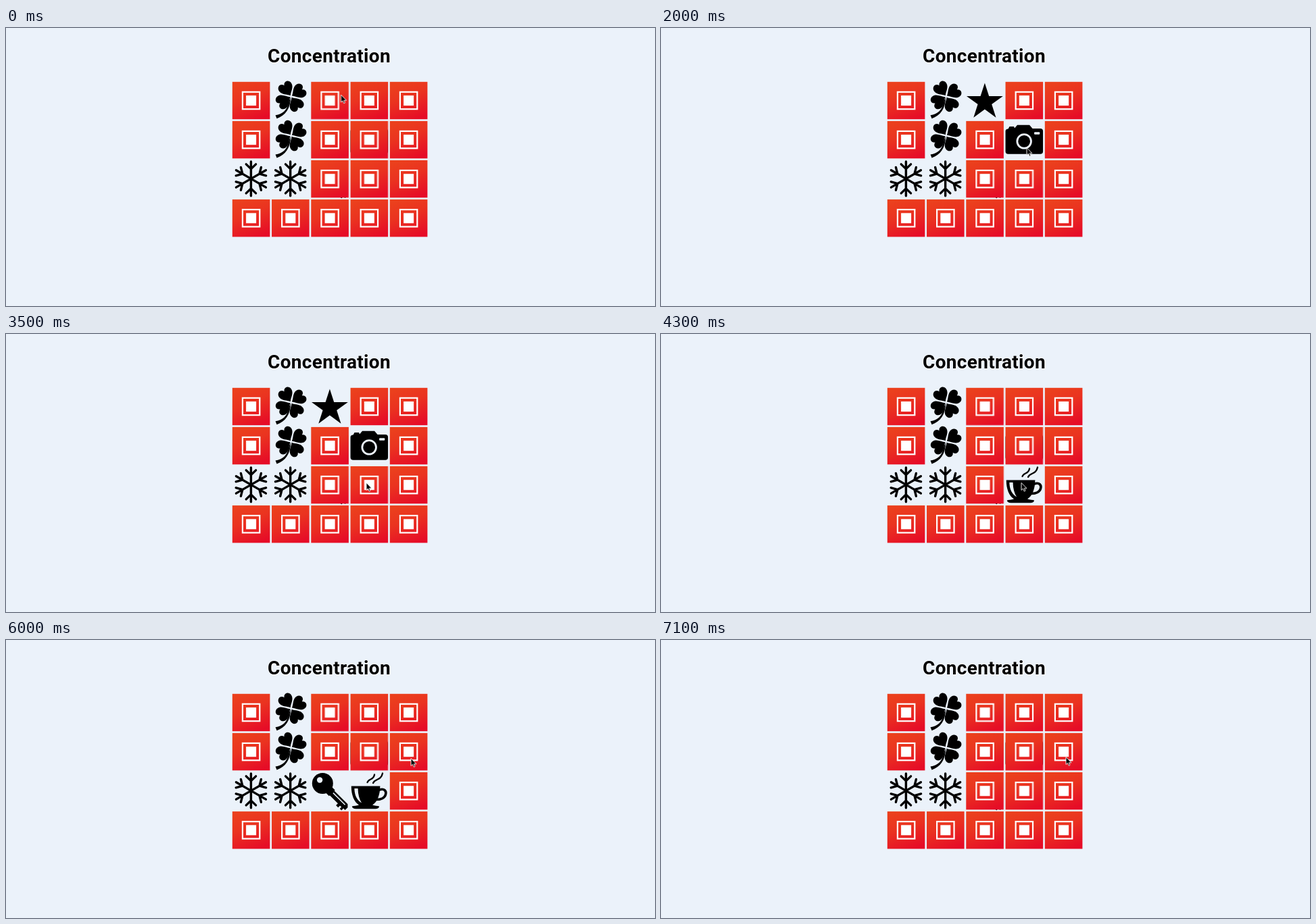
Write an HTML page that moves like this. It is 960 px wide and 412 px high and loops after 7200 ms.

```html
<!DOCTYPE html>
<html lang="en">
<head>
<meta charset="utf-8">
<title>Concentration</title>
<style>
  html, body { margin: 0; width: 100%; height: 100%; overflow: hidden; background: #ebf2fa; }
  svg { display: block; width: 960px; height: 412px; }
  .title {
    font: 700 28px Roboto, "Open Sans", sans-serif;
    letter-spacing: .3px;
    text-anchor: middle;
    text-shadow: 0 0 2px #fff, 1px 1px 1px #fff;
  }
  .line { fill: none; stroke: #000; stroke-linecap: round; stroke-linejoin: round; }
  .light { fill: #ebf2fa; }

  .star, .camera, .cup, .key { animation: 7.2s step-end infinite; }
  .star { animation-name: star; }
  .camera { animation-name: camera; }
  .cup { animation-name: cup; }
  .key { animation-name: key; }
  @keyframes star { 0%, 54.8% { opacity: 1 } 18% { opacity: 0 } }
  @keyframes camera { 0%, 54.8% { opacity: 1 } 27% { opacity: 0 } }
  @keyframes cup { 0%, 95.8% { opacity: 1 } 57.6% { opacity: 0 } }
  @keyframes key { 0%, 95.8% { opacity: 1 } 69.4% { opacity: 0 } }

  .pointer { animation: point 7.2s ease-in-out infinite; }
  @keyframes point {
    0% { transform: translate(495.5px, 99px) }
    13%, 20% { transform: translate(495.5px, 100px) }
    26.4%, 36% { transform: translate(541px, 177.5px) }
    46%, 61.5% { transform: translate(533px, 220.5px) }
    68%, 72% { transform: translate(479px, 224px) }
    79.5%, 86% { transform: translate(599px, 175.5px) }
    95%, 100% { transform: translate(599px, 173.5px) }
  }
</style>
</head>
<body>
<svg viewBox="0 0 960 412">
  <defs>
    <linearGradient id="red" x1=".3" y1="0" x2=".7" y2="1">
      <stop offset="0" stop-color="#eb401d"/>
      <stop offset=".4" stop-color="#ea3320"/>
      <stop offset="1" stop-color="#e60c27"/>
    </linearGradient>

    <g id="back">
      <rect width="55.6" height="55.4" fill="url(#red)"/>
      <rect x="15.1" y="15" width="25.4" height="25.4" fill="none" stroke="#fff" stroke-width="2.2"/>
      <rect x="20.3" y="20.2" width="15" height="15" fill="#fff"/>
    </g>

    <path id="leaf" d="M0-1.5C-3-6-10.5-9-10.5-16C-10.5-22-3-25 0-18.5C3-25 10.5-22 10.5-16C10.5-9 3-6 0-1.5Z"/>
    <g id="clover">
      <g transform="translate(28.6 21.6) rotate(-32) scale(1.03)">
        <use href="#leaf"/>
        <use href="#leaf" transform="rotate(90)"/>
        <use href="#leaf" transform="rotate(180)"/>
        <use href="#leaf" transform="rotate(270)"/>
      </g>
      <path d="M5.5 49.5C16 48 23 42 25 30L28 22C28 40 20 50 7.5 54.5Z"/>
    </g>

    <path id="arm" d="M0 0V-25.4M-7.2-21.5L0-14.5L7.2-21.5"/>
    <g id="snow" class="line" stroke-width="3.4"></g>

    <path id="star" d="M27.6 1.6L33.9 21.2H54.5L37.9 33.3L44.2 53L27.6 40.8L11 53L17.3 33.3L.7 21.2H21.3Z"/>

    <g id="camera">
      <path d="M4 11.5L6 8.2H12.5L13.5 10.5L17.5 5.8H35.5L40 11.2H51.5Q55.5 11.2 55.5 15.2V44.8Q55.5 48.8 51.5 48.8H4Q0 48.8 0 44.8V15Q0 11.5 4 11.5Z"/>
      <circle cx="27.6" cy="30" r="10.3" fill="none" stroke="#ebf2fa" stroke-width="2.8"/>
      <rect class="light" x="42.5" y="16.4" width="8.2" height="3.4" rx="1"/>
    </g>

    <g id="cup">
      <path d="M1.2 20.5H43.8C43.8 34 39.5 44 32.5 48.5C36 50 40 49.5 42.5 50.5Q42 54.3 37 54.3H8Q3 54.3 2.2 50.5C5 49.5 9 50 12.5 48.5C5.5 44 1.2 34 1.2 20.5Z"/>
      <path class="light" d="M5.8 24H11C11.2 33 13 40 16.5 45.5C9.5 41.5 6 34 5.8 24Z"/>
      <path class="line" stroke-width="3.6" d="M43 26C50 23.5 53.5 28 52 33C50.5 38.5 44 40.5 38.5 40.5"/>
      <path class="line" stroke-width="2.3" d="M25 15C27 8.5 34 12.5 35.5 3.5M33.5 16C36 9 45 13 47.5 1.5"/>
    </g>

    <g id="key">
      <circle cx="17" cy="16.5" r="15.5"/>
      <circle class="light" cx="12.8" cy="11.5" r="4.2"/>
      <g transform="translate(17 16.5) rotate(45)">
        <path d="M13-6H20V-4.5H48L51.5-1V4.5H48V8.5H44.5V5H41.5V9H37V5H20V6.5H13Z"/>
        <path class="light" d="M21-1.8H46V-.3H21Z"/>
      </g>
    </g>
  </defs>

  <rect width="960" height="412" fill="#ebf2fa"/>
  <text class="title" x="478" y="51">Concentration</text>
  <g id="board"></g>
  <path class="pointer" d="M0 0V11L2.5 8.8L4.2 12.6L6 11.8L4.4 8.2H8Z" stroke="#fff" stroke-width=".9"/>
</svg>
<script>
  const $ = id => document.getElementById(id);

  function use(parent, name, transform, cls) {
    const el = document.createElementNS("http://www.w3.org/2000/svg", "use");
    el.setAttribute("href", "#" + name);
    el.setAttribute("transform", transform);
    if (cls) el.setAttribute("class", cls);
    parent.append(el);
  }

  for (let a = 0; a < 360; a += 60) use($("snow"), "arm", `translate(27.6 27.4) rotate(${a})`);

  const cards = { 1: "clover", 6: "clover", 10: "snow", 11: "snow", 2: "star", 8: "camera", 12: "key", 13: "cup" };
  const solved = ["clover", "snow"];

  for (let i = 0; i < 20; i++) {
    const at = `translate(${334.8 + i % 5 * 58.25} ${79.8 + Math.floor(i / 5) * 58.1})`;
    const card = cards[i];
    if (card) use($("board"), card, at);
    if (!solved.includes(card)) use($("board"), "back", at, card);
  }
</script>
</body>
</html>
```
